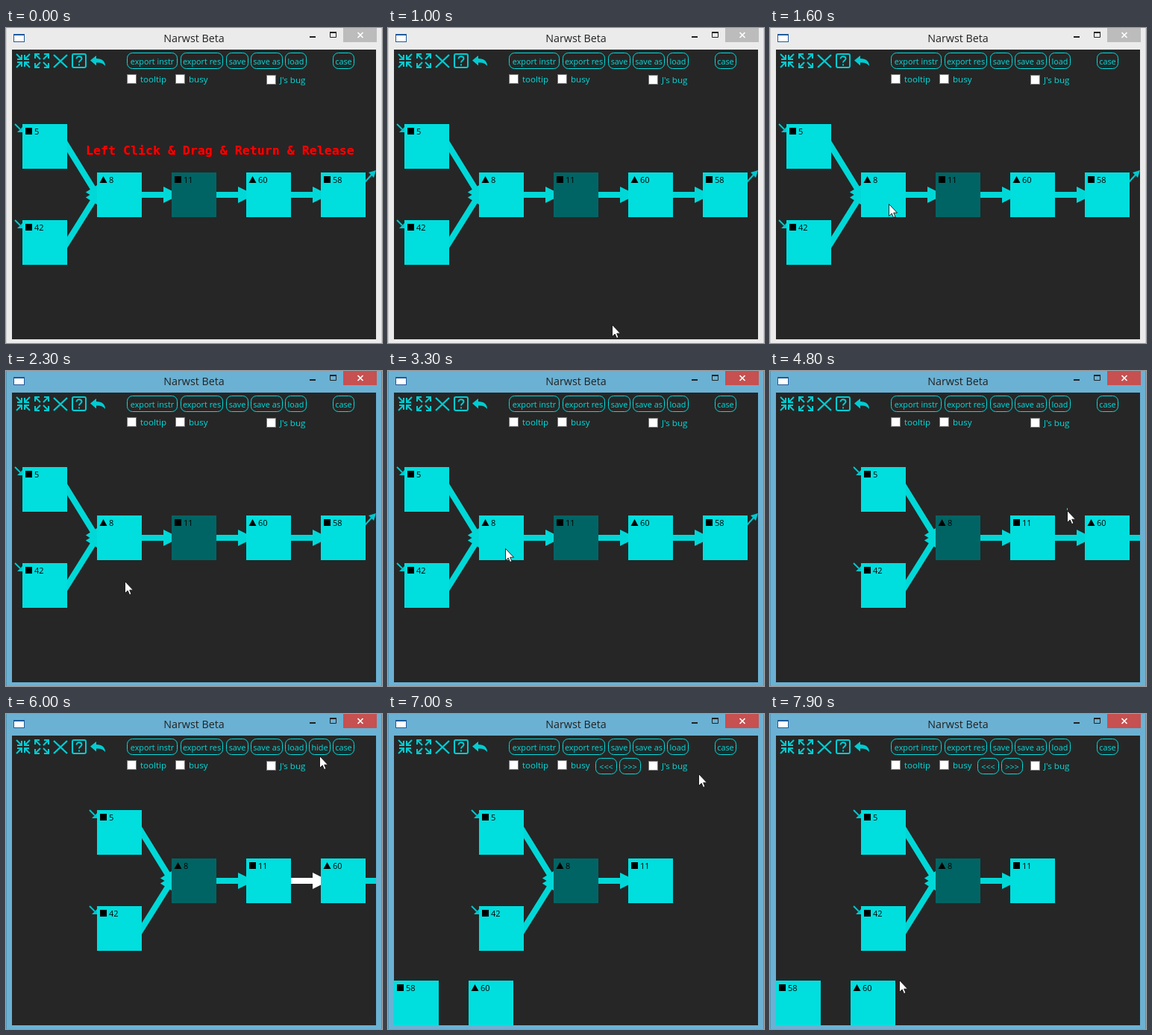
Animation of 504 by 423 pixels, one loop 8 s. Source, as an HTML page:

```html
<!DOCTYPE html>
<html lang="en">
<head>
<meta charset="utf-8">
<title>Narwst Beta</title>
<style>
  html, body { margin: 0; width: 100%; height: 100%; overflow: hidden; }
  svg { display: block; width: 504px; height: 423px; font: 11px "Open Sans", "Noto Sans", sans-serif; }
  .btn rect { fill: none; stroke: #00dede; }
  .btn.down rect { fill: #006464; }
  .btn text { fill: #00dede; font-size: 10.8px; text-anchor: middle; }
  .label { fill: #00dede; font-size: 11.6px; }
  .icon { fill: none; stroke: #00ccd2; stroke-width: 2; }
  .node rect.body { fill: #00dede; }
  .node.selected rect.body { fill: #006464; }
  .edge { fill: #00d8d8; }
  .edge.cut { fill: #fff; }
  .port { fill: #00c8ce; stroke: #00c8ce; stroke-width: 2; }
  .port polygon { stroke: none; }
</style>
</head>
<body>
<svg viewBox="0 0 504 423">
  <defs>
    <clipPath id="view"><rect x="8" y="29" width="488" height="389"/></clipPath>
  </defs>

  <rect id="frame" width="504" height="423"/>
  <path id="rim" d="M.5 0V423M503.5 0V423" fill="none"/>
  <rect x="10.5" y="8.5" width="14" height="10" fill="#fff" stroke="#205a9a"/>
  <path d="M10 9H25" stroke="#205a9a" stroke-width="2"/>
  <text x="252" y="19" font-size="14.3" text-anchor="middle" fill="#222">Narwst Beta</text>
  <path d="M407 12H415" stroke="#222" stroke-width="2"/>
  <path d="M434.5 6V12.5H442.5V6M434 6H443" fill="none" stroke="#222"/>
  <path d="M434 6H443" stroke="#222" stroke-width="2"/>
  <rect id="close" x="452" width="45" height="19"/>
  <path d="M471.5 6L478.5 13M478.5 6L471.5 13" stroke="#fff" stroke-width="1.7"/>
  <rect x="8" y="29" width="488" height="389" fill="#262626"/>

  <g class="icon">
    <path id="inward" d="M14 35L20 41M21 36V42H15M32 35L26 41M25 36V42H31M14 53L20 47M21 52V46H15M32 53L26 47M25 52V46H31"/>
    <path d="M39 41V35H45M40 36L46 42M51 35H57V41M56 36L50 42M39 47V53H45M40 52L46 46M51 53H57V47M56 52L50 46"/>
    <path d="M64 36L82 53M82 36L64 53" stroke-width="2.4"/>
    <rect x="89" y="35" width="18" height="18" rx="2"/>
    <path d="M94.500 41.500C94.500 37 101.500 37.500 101.500 41.200C101.500 43.500 98 43.500 98 46.500M98 48.500V50.500"/>
    <path d="M113 43.500L121 37V41C129 41 133 45 133 51C130 47 126 46 121 46.500V50.500Z" fill="#00ccd2" stroke="none"/>
  </g>
  <g id="toolbar"></g>
  <g clip-path="url(#view)"><g id="graph"></g></g>

  <text id="hint" x="107" y="170" font-size="16.6" font-weight="bold" fill="#f00"
    style="font-family:'DejaVu Sans Mono',monospace;text-shadow:1px 1px #800000">Left Click &amp; Drag &amp; Return &amp; Release</text>
  <path id="slice" stroke="#00dede"/>
  <path id="cursor" d="M.5 .5V16.500L4.200 13L6.600 18.500L9 17.500L6.700 12.200H11.500Z" fill="#fff" stroke="#111" stroke-width=".9"/>
</svg>

<script>
const $ = id => document.getElementById(id);
const show = (id, on) => $(id).style.display = on ? "" : "none";

const button = (id, text, x, y, w, h = 21) =>
  `<g class="btn" id="${id}"><rect x="${x + .5}" y="${y + .5}" width="${w - 1}" height="${h}" rx="7"/>
   <text x="${x + w / 2}" y="${y + 16}">${text}</text></g>`;

const checkbox = (text, x, y) =>
  `<rect x="${x + .5}" y="${y + .5}" width="12" height="12" fill="#fff" stroke="#777"/>
   <text class="label" x="${x + 18}" y="${y + 11}">${text}</text>`;

$("toolbar").innerHTML =
  button("instr", "export instr", 162, 33, 68) +
  button("res", "export res", 234, 33, 57) +
  button("save", "save", 295, 33, 30) +
  button("saveAs", "save as", 328, 33, 43) +
  button("load", "load", 374, 33, 29) +
  button("hide", "hide", 406, 33, 29) +
  button("case", "case", 438, 33, 29) +
  button("prev", "&lt;&lt;&lt;", 278, 59, 29) +
  button("next", "&gt;&gt;&gt;", 310, 59, 29) +
  checkbox("tooltip", 162, 62) + checkbox("busy", 227, 62) + checkbox("J's bug", 349, 63);

// Nodes and edges in graph coordinates; the whole graph shifts with the selection.
const nodes = { 5: [22, 129], 42: [22, 258], 8: [122, 194], 11: [222, 194], 60: [322, 194], 58: [422, 194] };
const triangles = ["8", "60"];

const node = ([name, [x, y]]) =>
  `<g class="node" id="n${name}" transform="translate(${x} ${y})">
   <rect class="body" width="60" height="60"/>
   ${triangles.includes(name) ? '<path d="M3.500 14L8.500 5L13.500 14Z"/>' : '<rect x="4" y="5" width="9" height="9"/>'}
   <text x="16" y="13.500">${name}</text></g>`;

function edge(from, to) {
  const [x1, y1] = nodes[from], [x2, y2] = nodes[to];
  const dx = x2 - x1 - 60, dy = y2 - y1, len = Math.hypot(dx, dy);
  const angle = Math.atan2(dy, dx) * 180 / Math.PI;
  return `<path class="edge" id="e${from}-${to}" transform="translate(${x1 + 60} ${y1 + 30}) rotate(${angle})"
    d="M-8 -4H${len - 11}V-11L${len + 11} 0L${len - 11} 11V4H-8Z"/>`;
}

const input = ([x, y]) =>
  `<g class="port" transform="translate(${x} ${y})"><path d="M-10 0L-3 7"/><polygon points="-7,11 0,4 0,11"/></g>`;

$("graph").innerHTML =
  [[5, 8], [42, 8], [8, 11], [11, 60], [60, 58]].map(e => edge(...e)).join("") +
  input(nodes[5]) + input(nodes[42]) +
  `<g class="port" id="output"><path d="M481 207L491 196"/><polygon points="496,191 486,194 493,201"/></g>` +
  Object.entries(nodes).map(node).join("");

// Pointer path: time, x, y
const path = [
  [1000, 300, 398], [1600, 159, 236], [1800, 159, 236], [2000, 159, 60], [2300, 159, 282],
  [2500, 117, 240], [2700, 204, 236], [2900, 165, 238], [3300, 157, 238], [3600, 157, 238],
  [4100, 431, 200], [4300, 398, 184], [4700, 398, 184], [4800, 398, 187], [5200, 398, 255],
  [5500, 398, 255], [5900, 419, 78], [6000, 420, 56], [6200, 420, 45], [6900, 420, 45],
  [7200, 407, 149], [7400, 407, 149], [7900, 173, 357]
];

function pointer(t) {
  const i = path.findIndex(p => p[0] > t);
  if (i < 1) return (i ? path[path.length - 1] : path[0]).slice(1);
  const [t0, x0, y0] = path[i - 1], [t1, x1, y1] = path[i];
  const k = (t - t0) / (t1 - t0);
  return [Math.round(x0 + (x1 - x0) * k), Math.round(y0 + (y1 - y0) * k)];
}

function draw() {
  const t = Math.floor(performance.now() % 8000 / 100) * 100;
  const active = t >= 1700, shifted = t >= 3400, cut = t >= 5100, hidden = t >= 6600;
  const [x, y] = pointer(t);

  $("frame").setAttribute("fill", active ? "#6bb1d3" : "#ebebeb");
  $("rim").setAttribute("stroke", active ? "#5796b6" : "#cfcfcf");
  $("close").setAttribute("fill", active ? "#c75050" : "#bcbcbc");

  show("hint", t < 1000);
  show("hide", cut && !hidden);
  show("prev", hidden);
  show("next", hidden);
  $("hide").classList.toggle("down", t >= 6400);

  $("graph").setAttribute("transform", `translate(${shifted ? 100 : 0} 0)`);
  $("n11").classList.toggle("selected", !shifted);
  $("n8").classList.toggle("selected", shifted);
  $("e11-60").classList.toggle("cut", cut);
  for (const id of ["e11-60", "e60-58", "output"]) show(id, !hidden);
  const place = (name, pos) => $("n" + name).setAttribute("transform", `translate(${pos})`);
  place(60, hidden ? [8, 358] : nodes[60]);
  place(58, hidden ? [-92, 358] : nodes[58]);

  show("slice", t >= 4800 && t < 5400);
  $("slice").setAttribute("d", `M398.5 184V${y}`);
  show("cursor", t >= 1000);
  $("cursor").setAttribute("transform", `translate(${x} ${y})`);
  requestAnimationFrame(draw);
}
draw();
</script>
</body>
</html>
```
